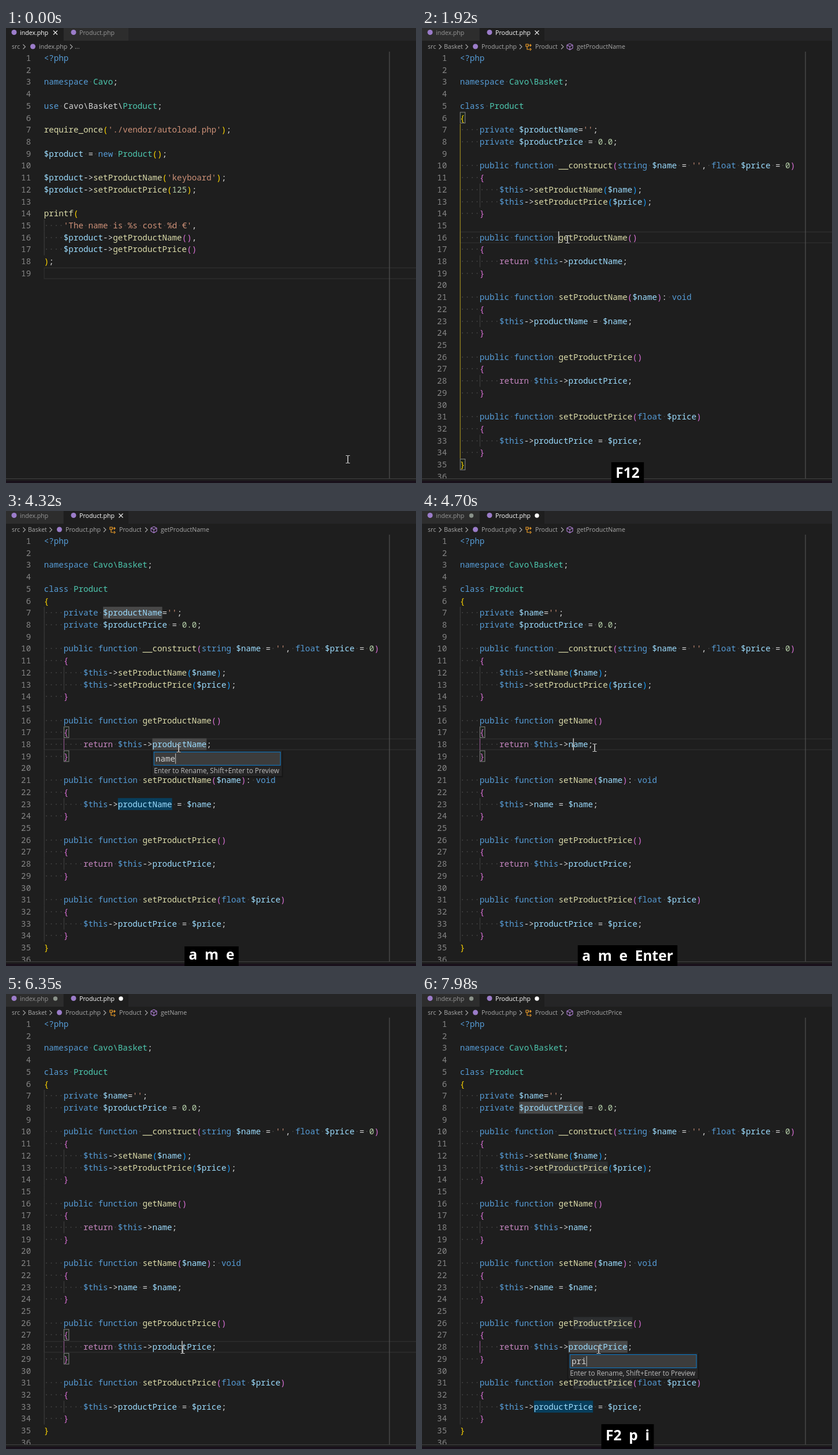
Recreate the animation shown at these times as an HTML page. Size 710x788 px, loop 8 s.

```html
<!DOCTYPE html>
<html lang="en">
<head>
<meta charset="utf-8">
<title>Renaming a symbol in a code editor</title>
<style>
  html, body { margin: 0; width: 100%; height: 100%; overflow: hidden; background: #1e1e1e; }
  svg { display: block; width: 710px; height: 788px; }
  .code { font: 14.225px "Noto Sans Mono", monospace; fill: #d4d4d4; }
  .num { fill: #858585; text-anchor: end; }
  .dot { fill: #454545; }
  .key { fill: #569cd6; }
  .flow { fill: #c586c0; }
  .type { fill: #4ec9b0; }
  .func { fill: #dcdcaa; }
  .var { fill: #9cdcfe; }
  .str { fill: #ce9178; }
  .lit { fill: #b5cea8; }
  .b0 { fill: #ffd700; }
  .b1 { fill: #da70d6; }
  .b2 { fill: #179fff; }
  .raw .b0, .raw .b1, .raw .b2 { fill: #d4d4d4; }
  .guide { fill: #404040; }
  .read { fill: #484848; }
  .write { fill: #083e5c; }
  .same { fill: #2c2e30; }
  .sel { fill: #264f78; }
  .match { fill: #1b241b; stroke: #888; }
  .row { fill: none; stroke: #2d2d2d; stroke-width: 1.5; }
  .caret { fill: #c4c5c3; }
  .ui { font: 10.6px "Open Sans", sans-serif; fill: #a9a9a9; }
  .line { fill: none; stroke: #a9a9a9; stroke-width: 1.1; }
  .hint { font-size: 11.7px; fill: #bcbcbc; }
  .keys { font: bold 24.5px "Open Sans", sans-serif; fill: #fff; text-anchor: middle; white-space: pre; }
</style>
</head>
<body>
<svg id="stage" viewBox="0 0 710 788"></svg>
<script>
const LOOP = 8000, CW = 8.535, LH = 20.71, X0 = 65.7, Y0 = 41.6;
const stage = document.getElementById('stage');
const pen = document.createElement('canvas').getContext('2d');

const indexCode = `<?php

namespace Cavo;

use Cavo\\Basket\\Product;

require_once('./vendor/autoload.php');

$product = new Product();

$product->setProductName('keyboard');
$product->setProductPrice(125);

printf(
    'The name is %s cost %d €',
    $product->getProductName(),
    $product->getProductPrice()
);
`;

const productCode = `<?php

namespace Cavo\\Basket;

class Product
{
    private $productName='';
    private $productPrice = 0.0;

    public function __construct(string $name = '', float $price = 0)
    {
        $this->setProductName($name);
        $this->setProductPrice($price);
    }

    public function getProductName()
    {
        return $this->productName;
    }

    public function setProductName($name): void
    {
        $this->productName = $name;
    }

    public function getProductPrice()
    {
        return $this->productPrice;
    }

    public function setProductPrice(float $price)
    {
        $this->productPrice = $price;
    }
}
`;

const colX = c => X0 + c * CW;
const rowY = n => Y0 + (n - 1) * LH;
const esc = s => s.replace(/&/g, '&amp;').replace(/</g, '&lt;').replace(/>/g, '&gt;');
const span = (cls, s) => `<tspan class="${cls}">${s}</tspan>`;
const rect = (x, y, w, h, attrs) => `<rect x="${x}" y="${y}" width="${w}" height="${h}" ${attrs}/>`;
const text = (x, y, s, cls, attrs = '') => `<text x="${x}" y="${y}" class="${cls}" ${attrs}>${s}</text>`;
const dots = s => s.replace(/ +/g, m => span('dot', '·'.repeat(m.length)));

// Named groups give each token its colour class.
const token = new RegExp([
  "(?<str>'[^']*')",
  '(?<key><\\?php|\\$this|\\b(?:namespace|use|class|private|public|function|new|string|float|void)\\b)',
  '(?<flow>\\breturn\\b)',
  '(?<type>(?<=namespace )[\\w\\\\]+|\\bProduct\\b)',
  '(?<func>\\w+(?=\\())',
  '(?<var>\\$\\w+|(?<=->)\\w+)',
  '(?<lit>\\b\\d[\\d.]*)',
  '(?<open>[({])|(?<close>[)}])',
  '(?<gap> +)|(?<rest>.)'
].join('|'), 'g');

function typeset(source) {
  let depth = 0, indent = 0, body = '', guides = '';
  source.split('\n').forEach((line, i) => {
    const out = line.replace(token, (...args) => {
      const s = args[0], groups = args[args.length - 1];
      const kind = Object.keys(groups).find(k => groups[k] !== undefined);
      if (kind === 'gap') return dots(s);
      if (kind === 'rest') return esc(s);
      if (kind === 'open') return span('b' + depth++, s);
      if (kind === 'close') return span('b' + --depth, s);
      return span(kind, dots(esc(s)));
    });
    indent = line ? line.search(/\S/) / 4 : Math.min(indent, 1);
    for (let k = 0; k < indent; k++) guides += rect(colX(4 * k), rowY(i + 1), 1, LH, 'class="guide"');
    const y = rowY(i + 1) + 15.4;
    body += text(43.2, y, i + 1, 'num') + text(X0, y, out, '');
  });
  return { body, guides };
}

const docs = {
  index: typeset(indexCode),
  product: typeset(productCode),
  renamed: typeset(productCode.replace(/([gs]et)ProductName/g, '$1Name').replace(/productName/g, 'name'))
};

const fileIcon = (x, y) => `<circle cx="${x}" cy="${y}" r="4.5" fill="#9b7cc9"/>`;
const chevron = x => `<path class="line" d="M${x - 2} 28.5l4 4-4 4"/>`;
const cross = x => `<path d="M${x - 3.5} 4.5l7 7m0-7l-7 7" stroke="#e8e8e8" stroke-width="1.2"/>`;
const classIcon = '<path d="M180 28h4v4h-4zM184 30h5M182 32v5h5M187 28l2 2-2 2M187 35l2 2-2 2" fill="none" stroke="#ee9d28" stroke-width="1.2"/>';
const methodIcon = '<path d="M256 27l5 2.500v5.500l-5 2.800-5-2.800v-5.500zM251 29.500l5 2.700 5-2.700M256 32.200v5.600" fill="none" stroke="#b180d7" stroke-width="1.1"/>';

function tabs(s) {
  const first = s.doc === 'index', on = '#fff', off = '#969696';
  let out = rect(0, 0, 710, 22, 'fill="#252526"')
    + rect(0, 0, 99.5, 22, `fill="${first ? '#1e1e1e' : '#2d2d2d'}"`)
    + rect(100, 0, 112, 22, `fill="${first ? '#2d2d2d' : '#1e1e1e'}"`)
    + fileIcon(14, 7.5) + fileIcon(117, 7.5)
    + text(24, 12, 'index.php', '', `fill="${first ? on : off}"`)
    + text(127, 12, 'Product.php', '', `fill="${first ? off : on}"`);
  if (s.doc === 'renamed') {
    out += '<circle cx="85.500" cy="8" r="3.700" fill="#8a928a"/><circle cx="199" cy="8" r="3.700" fill="#fff"/>';
  } else out += cross(first ? 85.5 : 199);
  return out;
}

function crumbs(s) {
  const y = 36.3;
  const start = text(10, y, 'src', '') + chevron(31.5);
  if (s.doc === 'index') {
    return start + fileIcon(46.5, 32) + text(57, y, 'index.php', '') + chevron(113) + text(119, y, '...', '');
  }
  return start + text(38, y, 'Basket', '') + chevron(77.5) + fileIcon(92.5, 32)
    + text(103, y, 'Product.php', '') + chevron(171) + classIcon
    + text(196, y, 'Product', '') + chevron(243) + methodIcon + text(268, y, s.member, '');
}

function marks(s) {
  let out = s.row ? rect(X0 + .5, rowY(s.row) + 1, 660, LH - 2, 'class="row"') : '';
  for (const [line, col, len, cls] of s.words) out += rect(colX(col), rowY(line), len * CW, LH, `class="${cls}"`);
  for (const [line, col] of s.pair) out += rect(colX(col) + .5, rowY(line) + .8, CW, LH - 2, 'class="match"');
  return out;
}

// Highlighted guide of the bracket pair around the caret.
function scope(s) {
  if (!s.scope) return '';
  const [from, to, level, reach] = s.scope, paint = `class="b${level}" opacity=".6"`;
  return rect(colX(4 * level), rowY(from), 1, (to - from + 1) * LH, paint)
    + (reach ? rect(X0, rowY(from) - .5, reach * CW, 1, paint) : '');
}

function renameBox({ line, value, picked }) {
  const x = 253.7, y = rowY(line + 1), w = value.length * CW;
  return rect(x - 2, y + 1, 228, 46, 'fill="#000" opacity=".25"')
    + rect(x, y, 224, 44.5, 'fill="#252526"')
    + rect(x + 2.5, y + 3, 219, 23, 'fill="#3c3c3c" stroke="#0a7bcb"')
    + (picked ? rect(x + 5.3, y + 5, w, 19, 'class="sel"') : '')
    + text(x + 5.3, y + 19.6, value, 'code')
    + rect(x + 5.3 + w, y + 5.5, 1, 18, 'class="caret"')
    + text(x + 2.5, y + 39.8, 'Enter to Rename, Shift+Enter to Preview', 'ui hint');
}

function keyBadge(keys) {
  const label = keys.split(' ').join('\u00a0\u00a0');
  const [top, base] = /p/.test(keys) ? [745, 773] : /[A-Z]/.test(keys) ? [752, 778.5] : [754, 776.5];
  pen.font = 'bold 24.5px "Open Sans", sans-serif';
  const w = pen.measureText(label).width + 15;
  return rect(356 - w / 2, top, w, 788 - top, 'fill="#000"') + text(356, base, label, 'keys');
}

function pointer([x, y]) {
  const d = `M${x - 3.5} ${y - 6.5}h2.500q1 0 1 1v11q0 1-1 1h-2.500m7 0h-2.500q-1 0-1-1v-11q0-1 1-1h2.500`;
  return `<path d="${d}" fill="none" stroke="#111" stroke-width="2.400" opacity=".5"/><path d="${d}" fill="none" stroke="#d8d8d8"/>`;
}

function draw(s) {
  const doc = docs[s.doc];
  stage.innerHTML = '<clipPath id="pane"><rect y="40" width="710" height="740"/></clipPath>'
    + rect(0, 0, 710, 788, 'fill="#1e1e1e"')
    + `<g class="ui">${tabs(s)}${crumbs(s)}</g>`
    + `<g class="code ${s.raw ? 'raw' : ''}" clip-path="url(#pane)">`
    + marks(s) + (s.raw ? '' : doc.guides) + scope(s) + doc.body
    + (s.caret ? rect(colX(s.caret[1]) - .5, rowY(s.caret[0]), 1.5, LH, 'class="caret"') : '') + '</g>'
    + rect(663.5, 41, 1, 739, 'fill="#5a5a5a"')
    + rect(0, 780, 710, 1, 'fill="#414141"') + rect(0, 784, 710, 4, 'fill="#19111b"')
    + (s.rename ? renameBox(s.rename) : '') + pointer(s.mouse) + (s.keys ? keyBadge(s.keys) : '');
}

const nameWords = [[7, 12, 12, 'read'], [18, 22, 11, 'read'], [23, 15, 11, 'write']];
const priceSame = [[13, 18, 12, 'same'], [26, 23, 12, 'same'], [31, 23, 12, 'same']];
const priceUses = [[8, 12, 13, 'read'], [33, 15, 12, 'write'], ...priceSame];
const typed = (line, value, keys) => ({ rename: { line, value }, keys });

// Pointer sweep to the lower method, one hop per screen refresh.
const sweep = Array.from({ length: 10 }, (_, i) => {
  const u = (i + 1) / 10, v = 1 - u;
  return [5190 + i * 75.6, { mouse: [299 * v * v + 306 * v * u + 306 * u * u, 410 * v * v + 1040 * v * u + 603 * u * u] }];
});

// Each step changes part of the state from its time on.
const steps = [
  [0, { doc: 'index', member: 'getProductName', row: 19, words: [], pair: [], mouse: [592, 747] }],
  [70, { mouse: [430, 520] }],
  [140, { mouse: [203, 275] }],
  [220, { mouse: [215, 256] }],
  [450, { mouse: [236, 318] }],
  [520, { mouse: [252, 368] }],
  [690, { mouse: [252, 364] }],
  [840, { row: 16, caret: [16, 22], pair: [[14, 6], [18, 0]], scope: [15, 17, 0, 6] }],
  [910, { mouse: [256, 366] }],
  [990, { mouse: [252, 366] }],
  [1150, { words: [[16, 14, 14, 'read']] }],
  [1380, { caret: null }],
  [1530, { keys: 'F12' }],
  [1610, { doc: 'product', raw: true, words: [], pair: [], scope: null, caret: [16, 20] }],
  [1840, { raw: false }],
  [1920, { pair: [[6, 0], [35, 0]], scope: [7, 34, 0] }],
  [2070, { caret: null }],
  [2300, { keys: '', mouse: [254, 368] }],
  [2380, { mouse: [262, 380] }],
  [2450, { mouse: [274, 391] }],
  [2530, { mouse: [284, 398], caret: [16, 20] }],
  [2760, { mouse: [298, 409] }],
  [2840, { row: 18, caret: [18, 27], pair: [[17, 4], [19, 4]], scope: [18, 18, 1] }],
  [2930, { keys: 'F2' }],
  [3000, { words: nameWords, mouse: [299, 411] }],
  [3080, { caret: null, rename: { line: 18, value: 'productName', picked: true } }],
  [3860, { keys: '' }],
  [4010, typed(18, 'n', 'n')],
  [4160, typed(18, 'na', 'n a')],
  [4240, typed(18, 'nam', 'a m')],
  [4320, typed(18, 'name', 'a m e')],
  [4470, { keys: 'a m e Enter' }],
  [4560, { rename: null }],
  [4700, { doc: 'renamed', words: [], caret: [18, 23], mouse: [299, 410] }],
  [5110, { caret: null, keys: '', member: 'getName' }],
  ...sweep,
  [5950, { mouse: [306, 610] }],
  [6030, { mouse: [306, 616] }],
  [6180, { row: 28, caret: [28, 28], pair: [[27, 4], [29, 4]], scope: [28, 28, 1] }],
  [6410, { row: 0, caret: [28, 34], pair: [], words: [[28, 22, 12, 'sel']] }],
  [6480, { words: [[28, 22, 12, 'sel'], ...priceSame] }],
  [6560, { member: 'getProductPrice' }],
  [6650, { words: [[28, 22, 12, 'sel'], ...priceUses] }],
  [6960, { caret: null }],
  [7120, { keys: 'F2' }],
  [7200, { words: [[28, 22, 12, 'read'], ...priceUses], rename: { line: 28, value: 'productPrice', picked: true } }],
  [7750, typed(28, 'p', 'F2 p')],
  [7840, typed(28, 'pr', 'F2 p r')],
  [7980, typed(28, 'pri', 'F2 p i')]
];

let state = {};
const states = steps.map(([, change]) => (state = { ...state, ...change }));
let shown = -1;

function tick() {
  const t = performance.now() % LOOP;
  const now = steps.findLastIndex(([at]) => at <= t);
  if (now !== shown) draw(states[shown = now]);
  requestAnimationFrame(tick);
}
tick();
</script>
</body>
</html>
```
